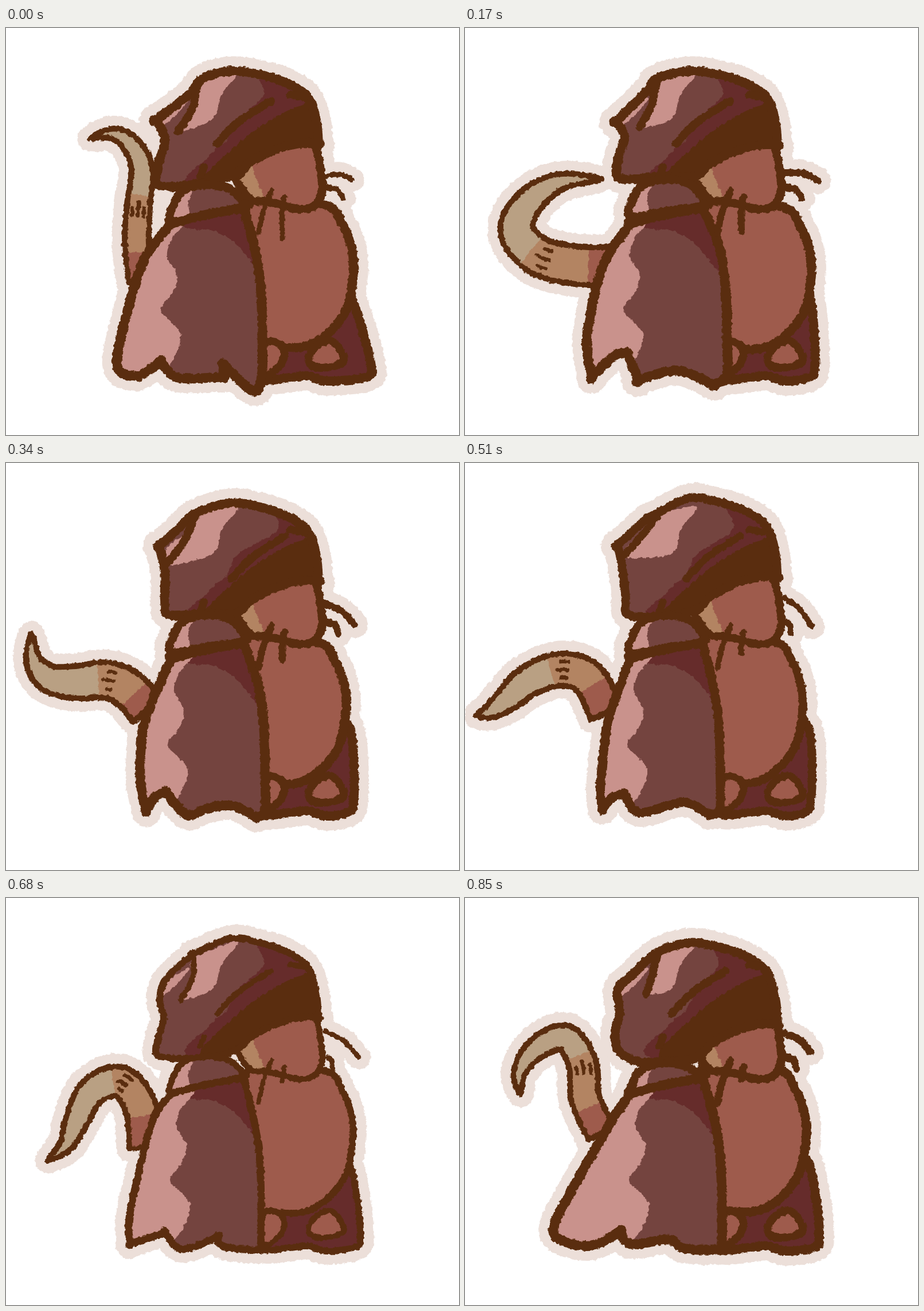
These frames come from a looping animation (790 by 709 pixels, 1.02 s). An HTML page with a canvas:

```html
<!DOCTYPE html>
<html lang="en">
<head>
<meta charset="utf-8">
<title>Hooded mouse</title>
<style>
  html, body { margin: 0; width: 100%; height: 100%; overflow: hidden; background: #fff; }
  canvas { display: block; filter: url(#rough); }
  svg { position: absolute; width: 0; height: 0; }
</style>
</head>
<body>
<canvas id="stage" width="790" height="709"></canvas>
<svg>
  <filter id="rough" x="0" y="0" width="1" height="1" color-interpolation-filters="sRGB">
    <feTurbulence type="fractalNoise" baseFrequency=".16" numOctaves="2" seed="4"/>
    <feDisplacementMap in="SourceGraphic" scale="6" xChannelSelector="R" yChannelSelector="G"/>
  </filter>
</svg>
<script>
const INK = '#5a2d0f', MAUVE = '#74443f', WINE = '#662c2b', PINK = '#c9928c',
      SKIN = '#9e5b4c', TAN = '#b9a083', CLAY = '#b38462', HALO = '#ecdfd9';
const STEP = 170;

// Points are "x,y"; a star marks a sharp corner. Everything not listed per pose is shared.
// head and brim: vertical shift of the hood's top and lower edge; shade: slide of its shadow.
// whisker: root y, tip x, tip y, x of the short one's tip.
const poses = [
  { line: 16, thin: 9, tailWidth: 21, head: 0, brim: -8, shade: 0, collar: 3, scallop: -10, side: 0, belly: [5, 0], backX: 637,
    whisker: [258, 603, 264, 588],
    tail: '235,440 228,375 231,310 237,245 217,202 185,184 147,192',
    hood: '345,270 270,275 264,245 277,195 262,160* 320,115 343,88', fold: '333,95 325,140 300,180',
    hem: '240,405 205,520 194,590 225,607 250,595 270,582* 300,609 376,608* 381,588* 432,633' },
  { line: 16, thin: 12, tailWidth: 33, head: 0, brim: -4, shade: 0, collar: -6, scallop: -4, side: 10, belly: [3, 3], backX: 610,
    whisker: [252, 615, 266, 587],
    tail: '262,414 200,414 130,398 90,353 112,303 165,268 238,263',
    hood: '345,258 270,262 268,225 278,190 264,162* 315,112 335,88', fold: '333,95 325,135 305,172',
    hem: '240,415 215,520 214,570 222,607* 262,570 283,568* 303,613* 370,597 432,621*' },
  { line: 16, thin: 12, tailWidth: 32, head: -5, brim: 0, shade: 25, collar: -5, scallop: 2, side: 5, belly: [-8, 3], backX: 606,
    whisker: [245, 608, 282, 580],
    tail: '246,430 215,395 175,378 120,382 75,375 48,345 44,298',
    hood: '345,262 285,265 277,240 277,190 267,145* 300,115 330,88', fold: '330,92 308,140 278,178',
    hem: '245,440 235,500 235,560 245,604* 262,580 280,574* 315,613 350,602 395,597 435,616*' },
  { line: 15, thin: 10, tailWidth: 29, head: -14, brim: -5, shade: 18, collar: -4, scallop: 3, side: -2, belly: [-12, 2], backX: 603,
    whisker: [235, 605, 285, 568],
    tail: '246,435 215,375 165,360 110,380 75,410 45,432 20,440',
    hood: '345,266 285,265 280,230 273,175 266,143* 315,98* 335,88', fold: '335,92 310,125 276,163',
    hem: '252,440 242,500 236,570 240,602* 258,582 278,577* 305,609 380,591 425,612*' },
  { line: 12, thin: 8, tailWidth: 27, head: -4, brim: 4, shade: 0, collar: 6, scallop: 6, side: -2, belly: [4, -8], backX: 618,
    whisker: [232, 615, 277, 570],
    tail: '242,435 235,365 200,320 150,337 122,390 105,430 73,457',
    hood: '345,278 268,276 265,245 275,210 268,175 280,140 325,98*', fold: '328,105 325,140 305,177',
    hem: '255,390 222,520 214,570 217,602* 250,592 277,583* 308,612 368,590* 380,607 437,613' },
  { line: 16, thin: 13, tailWidth: 25, head: 3, brim: 18, shade: -8, collar: 18, scallop: 6, side: 1, belly: [-6, -10], backX: 618,
    whisker: [236, 602, 268, 578],
    tail: '238,410 210,350 205,290 175,243 125,262 95,303 97,342',
    hood: '345,285 300,285 267,265 262,230 270,200 266,160 290,135 335,95', fold: '335,98 325,140 315,167',
    hem: '255,390 180,520 154,575 170,597 220,606 270,582* 290,603 355,595 380,610 435,613' },
];

const ctx = document.getElementById('stage').getContext('2d');
ctx.lineCap = ctx.lineJoin = 'round';

function points(text, dx = 0, dy = 0) {
  return text.split(' ').flatMap(token => {
    const [x, y] = token.split(',').map(parseFloat);
    const p = [x + dx, y + dy];
    return token.endsWith('*') ? [p, p] : [p];
  });
}

// Catmull-Rom position at u, counted in points.
function spline(pts, u, closed) {
  const n = pts.length, i = Math.floor(u), t = u - i;
  const at = k => pts[closed ? (k + n) % n : Math.max(0, Math.min(n - 1, k))];
  const [a, b, c, d] = [at(i - 1), at(i), at(i + 1), at(i + 2)];
  return [0, 1].map(k => b[k] + t / 2 * (c[k] - a[k]
    + t * (2 * a[k] - 5 * b[k] + 4 * c[k] - d[k] + t * (3 * (b[k] - c[k]) + d[k] - a[k]))));
}

function polygon(pts) {
  const path = new Path2D();
  pts.forEach(p => path.lineTo(...p));
  return path;
}

function curve(pts, closed = true) {
  const steps = 8, spans = closed ? pts.length : pts.length - 1;
  const path = polygon(Array.from({ length: spans * steps + 1 }, (_, i) => spline(pts, i / steps, closed)));
  if (closed) path.closePath();
  return path;
}
const line = (text, dx, dy) => curve(points(text, dx, dy), false);

function stroke(path, width, color = INK) {
  ctx.lineWidth = width;
  ctx.strokeStyle = color;
  ctx.stroke(path);
}

function shape(path, color, width, shades = []) {
  ctx.save();
  ctx.clip(path);
  for (const [patch, tone] of [[path, color], ...shades]) {
    ctx.fillStyle = tone;
    ctx.fill(patch);
  }
  ctx.restore();
  stroke(path, width);
}

// A tapering ribbon along a spine; side runs from -1 to 1 across it.
function ribbon(spine, width) {
  const last = spine.length - 1;
  const edge = (t, side) => {
    const [x, y] = spline(spine, t * last);
    const [x0, y0] = spline(spine, Math.max(0, t - .01) * last);
    const [x1, y1] = spline(spine, Math.min(1, t + .01) * last);
    const reach = side * width * (1 - t ** 3) / Math.hypot(x1 - x0, y1 - y0);
    return [x - (y1 - y0) * reach, y + (x1 - x0) * reach];
  };
  const run = (from, to, side) =>
    Array.from({ length: 31 }, (_, i) => edge(from + (to - from) * i / 30, side));
  const band = (from, to) => {
    const path = polygon([...run(from, to, 1), ...run(to, from, -1)]);
    path.closePath();
    return path;
  };
  return { run, band };
}

// A slightly arched hair.
const hair = (x0, y0, x1, y1) =>
  curve([[x0, y0], [(x0 + x1) / 2 + 3, (y0 + y1) / 2 - 6], [x1, y1]], false);

function draw(p, index) {
  const w = p.line, tailLine = 10;
  const bob = ([x, y]) => [x, y + p.head + (p.brim - p.head) * (y - 75) / 190];
  const dome = points('390,75 440,81 490,97 526,122 541,165 545,206* 510,207 470,218 430,238 400,262').map(bob);
  const fold = points(p.fold);
  const backX = p.backX;

  const tail = ribbon(points(p.tail), p.tailWidth);
  const tailShape = tail.band(0, 1);
  const hood = curve([...dome, ...points(p.hood)]);
  const face = line('400,262 440,222 490,198 535,200 548,245 551,285 537,310 508,315 460,303 425,298 400,262');
  const collar = curve(points('288,335 293,303 310,280 345,270 388,276 410,296 414,315 350,325', 0, p.collar));
  const cape = curve([...points('414,313* 340,327 288,341*'), ...points(p.hem),
    ...points('446,605 447,540 444,450 433,380', p.side)]);
  const belly = curve(points('415,312 548,308 582,343 599,390 600,438 587,493 553,535 510,556 455,553 435,540', ...p.belly));
  const back = curve(points(`575,430* 600,465 ${(600 + backX) / 2 + 4},530 ${backX},590 ${backX - 8},608 560,615 525,606 495,609 445,610 445,560`));
  const [rootY, tipX, tipY, shortX] = p.whisker;
  const whiskers = [hair(556, rootY, tipX, tipY), hair(560, 278, shortX, 297)];

  ctx.clearRect(0, 0, 790, 709);
  for (const part of [hood, face, collar, cape, belly, back]) stroke(part, w + 35, HALO);
  stroke(tailShape, tailLine + 35, HALO);
  for (const whisker of whiskers) stroke(whisker, p.thin + 34, HALO);

  shape(tailShape, TAN, tailLine, [[tail.band(0, .38), CLAY], [tail.band(0, .13), SKIN]]);
  for (const side of [-.5, 0, .5])
    stroke(polygon(tail.run(.29, side ? .325 : .35, side)), 6.5);

  shape(back, WINE, w);
  shape(belly, SKIN, w);
  shape(curve(points('450,550 480,552 484,576 468,597 448,602')), SKIN, w - 2);
  shape(curve(points('528,582 537,558 563,544 582,560 588,582 550,592')), SKIN, w - 2);
  for (const whisker of whiskers) stroke(whisker, p.thin);
  shape(face, SKIN, w - 1, [[curve(points('426,225* 436,262 455,305* 380,320* 380,225*')), CLAY]]);

  shape(hood, MAUVE, w, [
    [curve([...points('405,76 376,115 360,158'), ...[...fold].reverse()]), PINK],
    [curve(points('272,172 285,143 320,122 300,148')), PINK],
    [curve(points(`325,280 352,225 385,195 405,158 ${450 + p.shade},115 ${440 + p.shade},65 580,70* 580,320*`)), WINE],
    [curve(points('338,272 400,206 440,174 485,147 535,127 580,115* 580,270* 390,310*')), INK],
  ]);
  stroke(curve(fold, false), w - 2);
  stroke(line('368,202 405,164 462,127', p.shade), w - 2);
  stroke(line('345,242 339,258'), w - 2);
  stroke(line('495,116 520,120'), w - 2);

  shape(collar, MAUVE, w - 1, [[curve(points('326,262 318,300 318,350 250,350* 250,250*', 0, p.collar)), PINK]]);
  shape(cape, MAUVE, w + 1, [
    [curve(points('310,345 365,354 403,378 440,422 470,440* 450,280* 300,300*')), WINE],
    [curve(points('324,330 300,366 291,398 308,428 302,458 280,490 298,512 315,535 305,570 288,595 230,660* 100,640* 100,400* 280,300*', p.scallop)), PINK],
  ]);
  stroke(line('463,283 450,315 440,357'), p.thin);
  stroke(line(`486,294 482,315 482,${367 - index * 12}`), p.thin);
}

let shown = -1;
function tick(now) {
  const index = Math.floor(now / STEP) % poses.length;
  if (index !== shown) draw(poses[shown = index], index);
  requestAnimationFrame(tick);
}
tick(0);
</script>
</body>
</html>
```
